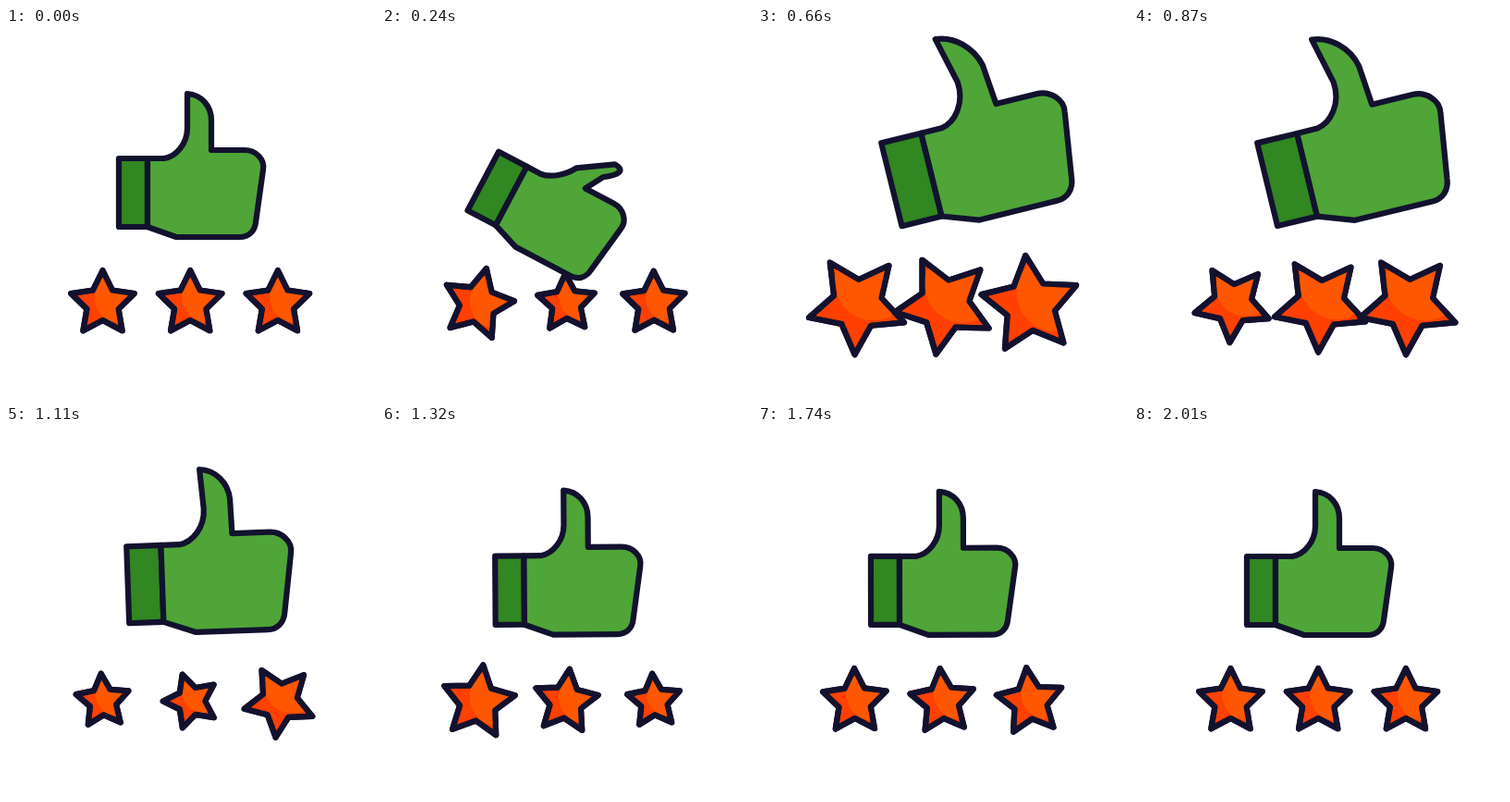
Recreate the animation shown at these times as an HTML page with a canvas. Size 400x400 px, loop 2.04 s.

```html
<!DOCTYPE html>
<html>
<head>
<meta charset="utf-8">
<style>
html, body { margin: 0; width: 100%; height: 100%; overflow: hidden; background: #fff; }
canvas { display: block; width: 100vmin; height: 100vmin; }
</style>
</head>
<body>
<canvas id="stage" width="400" height="400"></canvas>
<script>
const ctx = document.getElementById('stage').getContext('2d');
const LOOP = 2040, STEP = 30, LINE = 6.2;
const STAR_GAP = 94.7, STAR_LAG = 105;

const ease = p => (1 - Math.cos(Math.PI * Math.min(1, Math.max(0, p)))) / 2;

// Swells from 0 to 1 between a and b, and back to 0 between c and d
const pulse = (t, a, b, c, d) => ease((t - a) / (b - a)) - ease((t - c) / (d - c));

function polygon(points) {
  const path = new Path2D();
  points.forEach(([x, y]) => path.lineTo(x, y));
  path.closePath();
  return path;
}

function place(x, y, degrees, scale) {
  ctx.translate(x, y);
  ctx.rotate(degrees * Math.PI / 180);
  ctx.scale(scale, scale);
  ctx.lineWidth = LINE / scale; // same weight at every size
}

function paint(path, fill) {
  ctx.fillStyle = fill;
  ctx.fill(path);
  ctx.stroke(path);
}

// Coordinates start at the lower joint of palm and cuff
function palm(bend) {
  const path = new Path2D();
  const lean = (x, y) => {
    const h = Math.max(0, -83 - y); // height above the knuckles
    return [x + bend * h * h * .0115, y + bend * h * .36];
  };
  path.moveTo(0, 0);
  path.lineTo(0, -74);
  path.lineTo(18, -74);
  path.bezierCurveTo(31, -76, ...lean(43, -90), ...lean(43, -107));
  path.lineTo(...lean(43, -144));
  path.bezierCurveTo(...lean(58, -143), ...lean(69, -131), ...lean(69, -115));
  path.lineTo(69, -83);
  path.lineTo(105, -83);
  path.bezierCurveTo(117, -83, 127, -73, 125, -62);
  path.lineTo(117, -5);
  path.bezierCurveTo(116, 5, 109, 11, 100, 11);
  path.lineTo(31, 11);
  path.closePath();
  return path;
}

function drawHand(t) {
  const dip = pulse(t, 0, 250, 260, 500);
  const slide = pulse(t, 280, 660, 840, 1370);
  const rise = pulse(t, 280, 660, 840, 1260);
  const swell = pulse(t, 280, 600, 840, 1370);
  const tilt = pulse(t, 280, 600, 840, 1200);
  const settle = pulse(t, 1260, 1400, 1500, 1800);
  const cuff = 31 + 4.5 * Math.min(1, dip + swell);

  ctx.save();
  place(200 - 20 * dip + 44.5 * slide,
        178 + 25 * dip - 33.5 * rise - 2 * settle,
        28 * dip - 13.9 * tilt - settle,
        1 - .03 * dip + .25 * swell);
  ctx.translate(-47, 37);
  paint(polygon([[0, 0], [0, -74], [-cuff, -74], [-cuff, 0]]), '#318721');
  paint(palm(dip - .27 * rise), '#4fa537');
  ctx.restore();
}

const star = polygon(Array.from({ length: 10 }, (_, i) => {
  const r = i % 2 ? 18 : 36, a = i * Math.PI / 5;
  return [r * Math.sin(a), 3.5 - r * Math.cos(a)];
}));

function drawStar(x, t) {
  const radius = 36
    - 4 * pulse(t, 0, 110, 110, 440)
    + 18.2 * pulse(t, 110, 440, 690, 1060)
    - 7 * pulse(t, 690, 1060, 1060, 1350)
    + 4.8 * pulse(t, 1060, 1350, 1350, 1620);
  const angle =
    - 3 * pulse(t, 0, 110, 110, 285)
    + 16.5 * pulse(t, 110, 285, 285, 640)
    - 33 * pulse(t, 285, 640, 815, 1280)
    + 8.5 * pulse(t, 815, 1280, 1280, 1530)
    - 6.5 * pulse(t, 1280, 1530, 1530, 1800);

  ctx.save();
  place(x, 294.6, angle, radius / 36);
  paint(star, '#ff4000');
  ctx.save();
  ctx.clip(star);
  ctx.fillStyle = '#ff5700';
  ctx.beginPath();
  ctx.arc(19, -4, 28, 0, 2 * Math.PI);
  ctx.fill();
  ctx.fillRect(19, -40, 40, 80); // lit side reaches the right tips
  ctx.restore();
  ctx.stroke(star);
  ctx.restore();
}

function frame() {
  const t = Math.floor(performance.now() % LOOP / STEP) * STEP;
  ctx.clearRect(0, 0, 400, 400);
  ctx.strokeStyle = '#12122f';
  ctx.lineJoin = 'round';
  drawHand(t);
  for (let i = 0; i < 3; i++) drawStar(104.5 + i * STAR_GAP, t - i * STAR_LAG);
  requestAnimationFrame(frame);
}
frame();
</script>
</body>
</html>
```
